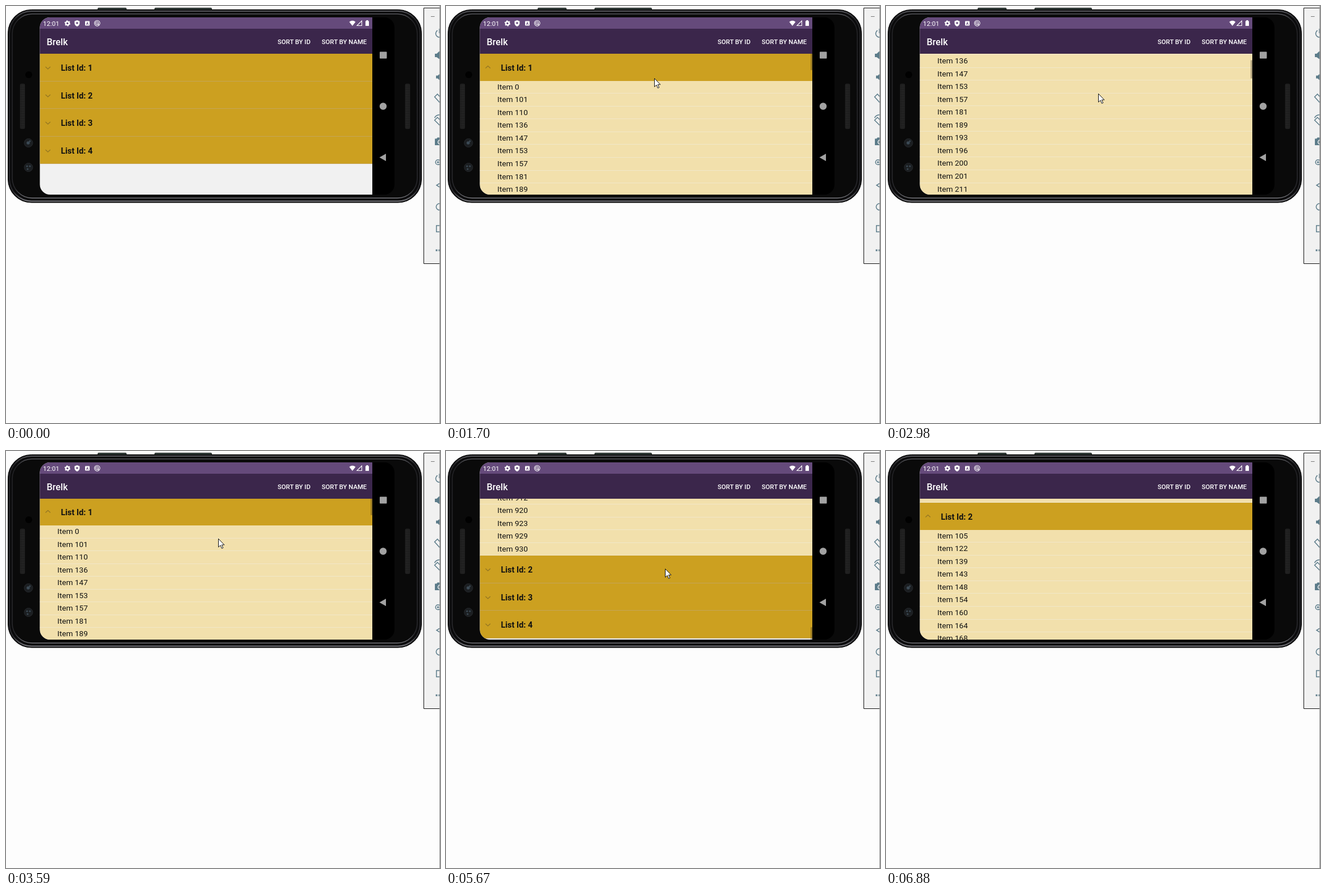
Animation, 763 px wide and 734 px high, one loop 7440 ms. Source, as an HTML page with a canvas:

```html
<!DOCTYPE html>
<html lang="en">
<head>
<meta charset="utf-8">
<title>Expandable list demo</title>
<style>
  html, body { margin: 0; width: 100%; height: 100%; overflow: hidden; background: #fdfdfd; }
  svg, canvas { position: absolute; left: 0; top: 0; }
  text { font-family: Roboto, sans-serif; fill: #fff; }
  .menu { font-size: 11.3px; font-weight: 500; }
  .tool { fill: none; stroke: #5c7c8a; stroke-width: 1.5; }
  .solid { fill: #5c7c8a; }
</style>
</head>
<body>
<svg width="763" height="734" viewBox="0 0 763 734">
  <defs>
    <linearGradient id="rim" x2="0" y2="1">
      <stop offset="0" stop-color="#55555a"/><stop offset=".04" stop-color="#242427"/>
      <stop offset=".95" stop-color="#29292d"/><stop offset="1" stop-color="#77777c"/>
    </linearGradient>
    <pattern id="mesh" width="3" height="3" patternUnits="userSpaceOnUse">
      <rect width="3" height="3" fill="#171717"/><circle cx="1.5" cy="1.5" r="1" fill="#333"/>
    </pattern>
    <clipPath id="screen"><path d="M644 20H77.500a18 18 0 0 0-18 18V314a18 18 0 0 0 18 18H644Z"/></clipPath>
    <clipPath id="panel"><path d="M734 3h28v452h-28z"/></clipPath>
  </defs>

  <!-- phone body -->
  <g fill="#3a4843" stroke="#1a1d1c">
    <rect x="161.500" y="3.500" width="50" height="6" rx="1"/>
    <rect x="261.500" y="3.500" width="100" height="6" rx="1"/>
  </g>
  <rect x="3.500" y="6.500" width="727" height="339.500" rx="41" fill="#0b0b0c" stroke="#050505"/>
  <rect x="6" y="9" width="722" height="334.500" rx="39" fill="none" stroke="url(#rim)" stroke-width="2"/>
  <rect x="11" y="14" width="712" height="324" rx="35" fill="#0a0a0a" stroke="url(#rim)" stroke-width="1.500"/>
  <path d="M644 20h21a18 18 0 0 1 18 18v276a18 18 0 0 1-18 18h-21z"/>
  <g fill="url(#mesh)" stroke="#222" stroke-width=".7">
    <rect x="25" y="137" width="8" height="79" rx="2"/>
    <rect x="702" y="137" width="8" height="79" rx="2"/>
  </g>
  <circle cx="40" cy="121" r="6" fill="#010101"/>
  <g fill="#1b1e21" stroke="#25282b">
    <circle cx="39.500" cy="241" r="7.500"/><circle cx="39.500" cy="284" r="7.500"/>
  </g>
  <g fill="#3c4a55">
    <circle cx="39" cy="241" r="2.800"/><circle cx="42" cy="238" r="1.400"/>
    <circle cx="37" cy="282" r="1.600"/><circle cx="42" cy="282" r="1.600"/><circle cx="38" cy="287" r="1.600"/>
  </g>
  <g fill="#a2a2a2">
    <rect x="657" y="80.500" width="12.500" height="12" rx="1"/>
    <circle cx="663" cy="176.500" r="6.200"/>
    <path d="M656.500 266.500L668 260v13z"/>
  </g>

  <!-- screen -->
  <g clip-path="url(#screen)">
    <path fill="#f1f1f1" d="M59 20h586v312H59z"/>
    <path fill="#654a7b" d="M59 20h586v20H59z"/>
    <path fill="#3b264b" d="M59 40h586v44H59z"/>
  </g>
  <text x="65" y="34.500" font-size="11.500">12:01</text>
  <text x="71.500" y="68.500" font-size="16.300" font-weight="500">Brelk</text>
  <text class="menu" x="477.500" y="66.500">SORT BY ID</text>
  <text class="menu" x="555" y="66.500">SORT BY NAME</text>
  <g fill="#fff">
    <circle cx="108" cy="30.500" r="2.900" fill="none" stroke="#fff" stroke-width="2.300"/>
    <circle cx="108" cy="30.500" r="4.500" fill="none" stroke="#fff" stroke-width="1.300" stroke-dasharray="2.350"/>
    <path d="M125 25l4.500 1.800v3.200q0 4-4.500 6-4.500-2-4.500-6v-3.200z"/>
    <circle cx="125" cy="30" r="1.800" fill="#654a7b"/>
    <rect x="139" y="26.500" width="8" height="8" rx="1"/>
    <path d="M141.300 33l1.700-4.500 1.700 4.500m-2.700-1.500h2" fill="none" stroke="#654a7b" stroke-width=".9"/>
    <g fill="none" stroke="#fff" stroke-width="1.100">
      <circle cx="160.300" cy="30.300" r="4.800"/><circle cx="160" cy="30" r="2.300"/><path d="M161 31l3 3"/>
    </g>
    <path d="M603.500 28q5.500-4.500 11 0L609 35z"/>
    <path d="M617 34.500h8.500V26z" fill="none" stroke="#fff" stroke-width="1.100"/>
    <path d="M632 26.500h1.500V25h3v1.500H638V35h-6z"/>
  </g>

  <!-- tool panel -->
  <path d="M763 3.500h-28.500v450H763" fill="#f1f1f1" stroke="#111"/>
  <g class="tool" clip-path="url(#panel)">
    <path d="M747 18.500h6.500" stroke="#777" stroke-width="1"/>
    <path d="M758.500 43a6.500 6.500 0 1 0 7 0M762 40v8"/>
    <path class="solid" stroke="none" d="M754 84h3l5-4.500v14L757 90h-3zM756 122.500h3l4-3.500v12l-4-3.500h-3z"/>
    <path d="M758.500 155l-5 5 9 10 5-5zM758.500 196l-5 5 9 9 5-5zM753.500 197q2-5 8.500-5.500"/>
    <path class="solid" stroke="none" d="M754 233.500h3l1.500-2H768V245h-14z"/>
    <circle cx="763" cy="239.500" r="3.500" stroke="#f1f1f1"/>
    <circle cx="759.500" cy="275" r="4.300"/><path d="M757.500 275h4M759.500 273v4M762.500 278.500l4 4"/>
    <path d="M766 310l-9 5.500 9 5.500z"/>
    <circle cx="762" cy="353.500" r="5.700"/>
    <path d="M756.700 386.500h12v11h-12z"/>
    <path class="solid" stroke="none" d="M755.500 428.500h3v3h-3zM760.500 428.500h3v3h-3z"/>
  </g>
  <path d="M762.500 0v734" stroke="#999"/>
</svg>
<canvas width="763" height="734"></canvas>

<script>
const LOOP = 7440, LEFT = 59.5, TOP = 84, WIDTH = 584.5, VIEW = 248;
const HEADER = 48.5, OPEN_HEADER = 47.7, ITEM = 22.55;
const ctx = document.querySelector('canvas').getContext('2d');

const ticks = [0, 630, 780, 930, 1050, 1200, 1700, 2260, 2380, 2500, 2620, 2740, 2860, 2980,
  3100, 3220, 3470, 3590, 3990, 4140, 4260, 4380, 4500, 4620, 4890, 5040, 5180, 5300, 5420,
  5670, 5820, 5940, 6320, 6440, 6580, 6750, 6880];

// [time, value]
const scrollKeys = [[0, 0], [2140, 0], [2980, 113.3], [3220, 60], [3350, 60], [3590, 0.7],
  [3870, 0.7], [3990, 250], [4260, 1710.2], [4380, 1762], [4620, 1773.8], [5700, 1773.8], [5940, 1867.2]];
const openKeys = [[0, 0], [1700, 1], [5820, 2]];
const barKeys = [[0, 0], [1700, 1], [4890, .5], [5040, 0], [5670, 1], [6440, .5], [6580, 0]];

// [time, shape, x, y]
const pointerKeys = [[0], [630, 'beam', 442, 630], [780, 'arrow', 395, 88], [930, 'arrow', 378, 84],
  [1050, 'arrow', 365, 112], [1200, 'arrow', 366, 127], [2260, 'arrow', 370, 142],
  [2380, 'arrow', 373, 154], [3990, 'arrow', 376, 125], [4140, 'arrow', 378, 108],
  [4260, 'arrow', 378, 101], [4890, 'arrow', 367, 224], [5040, 'arrow', 372, 238],
  [5180, 'arrow', 378, 222], [5300, 'arrow', 383, 211], [5420, 'arrow', 385, 207],
  [6320, 'beam', 540, 450], [6440, 'beam', 699, 693], [6750, 'arrow', 703, 710], [6880]];

const held = (keys, t) => keys.findLast(k => k[0] <= t);

function tween(keys, t) {
  const i = keys.findLastIndex(k => k[0] <= t), [t0, a] = keys[i];
  if (i === keys.length - 1) return a;
  const [t1, b] = keys[i + 1];
  return a + (b - a) * (t - t0) / (t1 - t0);
}

const middle = Array.from({ length: 60 }, (_, i) => 222 + 11 * i + i * 7 % 9);
const firstItems = [0, 101, 110, 136, 147, 153, 157, 181, 189, 193, 196, 200, 201, 211,
  ...middle, 891, 90, 912, 920, 923, 929, 930];
const secondItems = [105, 122, 139, 143, 148, 154, 160, 164, 168];
for (let i = 0; i < 59; i++) secondItems.push(179 + 13 * i);

// Rows for 0, 1 or 2 expanded groups.
function buildRows(open) {
  const rows = [];
  let top = 0;
  const add = row => { rows.push({ top, ...row }); top += row.height; };
  for (let id = 1; id <= 4; id++) {
    const expanded = id <= open;
    add({ header: true, height: expanded ? OPEN_HEADER : HEADER, label: 'List Id: ' + id, expanded });
    if (expanded)
      for (const n of [firstItems, secondItems][id - 1]) add({ height: ITEM, label: 'Item ' + n });
  }
  return rows;
}
const layouts = [0, 1, 2].map(buildRows);

function fill(color, x, y, w, h) {
  ctx.fillStyle = color;
  ctx.fillRect(x, y, w, h);
}

function write(label, font, x, y) {
  ctx.font = font + ' Roboto, sans-serif';
  ctx.fillStyle = '#111';
  ctx.fillText(label, x, y);
}

function drawRow(row, y) {
  const top = Math.round(y), height = Math.round(y + row.height) - top;
  fill(row.header ? '#cca020' : '#f2e0ac', LEFT, top, WIDTH, height);
  if (!row.expanded) fill(row.header ? '#c5a558' : '#f1e7c9', LEFT, top + height - 1, WIDTH, 1);
  if (!row.header) return write(row.label, '13.6px', 90.3, top + 15);
  write(row.label, 'bold 14.4px', 96.5, top + 30);
  const bend = row.expanded ? -2 : 2, mid = top + (row.expanded ? 23.5 : 25);
  ctx.strokeStyle = '#927423';
  ctx.lineWidth = 1.2;
  ctx.beginPath();
  ctx.moveTo(69.5, mid - bend);
  ctx.lineTo(73.7, mid + bend);
  ctx.lineTo(78, mid - bend);
  ctx.stroke();
}

// Scroll bar length and place are measured in rows.
function rowIndex(rows, y) {
  const i = rows.findLastIndex(r => r.top <= y);
  return i + Math.min(1, (y - rows[i].top) / rows[i].height);
}

function drawList(rows, scroll, barAlpha) {
  ctx.save();
  ctx.beginPath();
  ctx.roundRect(LEFT, TOP, WIDTH, VIEW, [0, 0, 0, 18]);
  ctx.clip();
  for (const row of rows) {
    const y = row.top - scroll;
    if (y < VIEW && y + row.height > 0) drawRow(row, TOP + y);
  }
  const unit = VIEW / rows.length;
  const from = rowIndex(rows, scroll) * unit, to = rowIndex(rows, scroll + VIEW) * unit;
  fill(`rgba(60, 50, 40, ${.34 * barAlpha})`, 641, TOP + from, 3, to - from);
  ctx.restore();
}

const arrow = new Path2D('M.5 .5V15.200L4 12 6.400 17.500 8.700 16.500 6.300 11.200H10.800Z');
const beam = new Path2D('M0 .5H2.500M3.500 .5H6M3 1V12.500M0 13H2.500M3.500 13H6');

function drawPointer([, shape, x, y]) {
  if (!shape) return;
  ctx.save();
  ctx.translate(x, y);
  ctx.strokeStyle = '#111';
  ctx.lineWidth = 1;
  if (shape === 'arrow') {
    ctx.fillStyle = '#fff';
    ctx.fill(arrow);
  }
  ctx.stroke(shape === 'arrow' ? arrow : beam);
  ctx.restore();
}

function draw(now) {
  const t = ticks.findLast(tick => tick <= now % LOOP);
  ctx.clearRect(0, 0, 763, 734);
  drawList(layouts[held(openKeys, t)[1]], tween(scrollKeys, t), held(barKeys, t)[1]);
  drawPointer(held(pointerKeys, t));
}

const start = performance.now();
function frame() {
  draw(performance.now() - start);
  requestAnimationFrame(frame);
}
frame();
</script>
</body>
</html>
```
